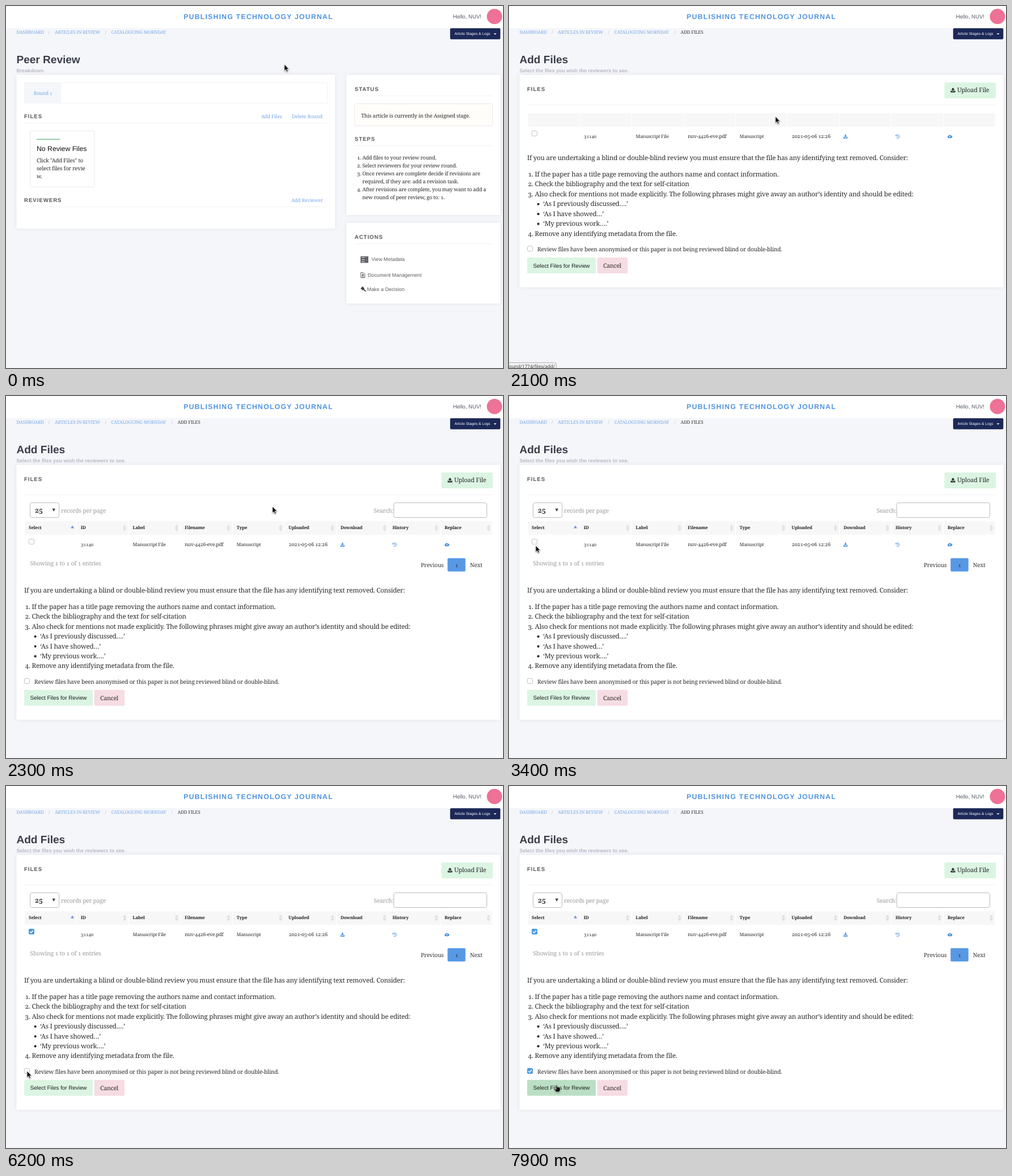
These frames come from a looping animation (876x639 px, 8 s). An HTML page:

```html
<!DOCTYPE html>
<html lang="en">
<head>
<meta charset="utf-8">
<title>Peer review</title>
<style>
html, body { margin: 0; width: 100%; height: 100%; overflow: hidden; background: #f5f6fa; }
svg { display: block; width: 876px; height: 639px; }
text { text-rendering: geometricPrecision; white-space: pre; }
.serif { font-family: "Noto Serif", serif; letter-spacing: -.021em; font-variant-numeric: oldstyle-nums; }
.sans { font-family: "Liberation Sans", Arial, sans-serif; }
.ui { font-family: "Noto Sans", sans-serif; }
.head { letter-spacing: .1em; }
.bold { font-weight: 700; }
.end { text-anchor: end; }
.mid { text-anchor: middle; }
.card { fill: #fff; filter: drop-shadow(0 0 3px rgba(60, 70, 110, .11)); }
#cursor { filter: drop-shadow(.5px 1px 1px rgba(0, 0, 0, .4)); }
</style>
</head>
<body>
<svg id="stage" viewBox="0 0 876 639"></svg>
<script>
const LOOP = 8000;
const INK = '#2b2b2b', LINK = '#77a8e6', BLUE = '#4f94e3', RULE = '#f2f2f5';

const label = (x, y, size, fill, cls, str, id = '') =>
  `<text ${id && `id="${id}"`} x="${x}" y="${y}" font-size="${size}" fill="${fill}" class="${cls}">${str}</text>`;
const serif = (x, y, size, str, fill = INK, cls = '', id) => label(x, y, size, fill, 'serif ' + cls, str, id);
const sans = (x, y, size, str, fill = INK, cls = '', id) => label(x, y, size, fill, 'sans ' + cls, str, id);
const heading = (x, y, str) => sans(x, y, 9.65, str, '#555', 'bold head');
const box = (x, y, w, h, fill, more = '') =>
  `<rect x="${x}" y="${y}" width="${w}" height="${h}" fill="${fill}" ${more}/>`;
const card = (x, y, w, h, id = '') => `<rect id="${id}" class="card" x="${x}" y="${y}" width="${w}" height="${h}" rx="1"/>`;
const rule = (x, y, w) => box(x, y, w, 1, RULE);
const path = (d, fill, more = '') => `<path d="${d}" fill="${fill}" ${more}/>`;
const line = (d, color, width = 1) => path(d, 'none', `stroke="${color}" stroke-width="${width}"`);
const at = (x, y, body, scale = 1) => `<g transform="translate(${x} ${y}) scale(${scale})">${body}</g>`;
const group = (id, ...parts) => `<g id="${id}">${parts.join('')}</g>`;

const arrowUp = 'M4 0L7 3.4H5V6.2H3V3.4H1Z';
const arrowDown = 'M4 6.2L7 2.8H5V0H3V2.8H1Z';
const tray = 'M0 5.2H2.2V6.8H5.8V5.2H8V8.2H0Z';
const cloud = 'M2 7.2A2 2 0 0 1 1.6 3.3A2.5 2.5 0 0 1 6 2.4A2.3 2.3 0 0 1 6.4 7.2Z';

const checkbox = (id, x, y) => at(x, y,
  box(.5, .5, 9, 9, '#fff', 'rx="2" stroke="#c0c0c0"') +
  group(id, box(0, 0, 10, 10, '#4b9be3', 'rx="2"'), line('M2.2 5.2L4.2 7.2L7.9 2.9', '#fff', 1.5)));

const header = [
  box(0, 0, 876, 39, '#fff'),
  sans(313, 23.2, 12.28, 'PUBLISHING TECHNOLOGY JOURNAL', BLUE, 'bold head'),
  sans(838, 22, 9.65, 'Hello, NUV!', '#555b66', 'end'),
  '<circle cx="861" cy="18.5" r="13.5" fill="#ee7196"/>',
  serif(18.5, 48.5, 8, 'DASHBOARD', LINK),
  serif(75, 48.5, 8, '/', '#b5bac5'),
  serif(86, 48.5, 8, 'ARTICLES IN REVIEW', LINK),
  serif(174.5, 48.5, 8, '/', '#b5bac5'),
  serif(185.5, 48.5, 8, 'CATALOGUING MORNDAY', LINK),
  box(782.8, 39.2, 88.5, 19.6, '#1b2858', 'rx="2"'),
  sans(790.5, 51.3, 6.6, 'Article Stages &amp; Logs', '#fff'),
  path('M859.5 48.2H864.5L862 50.8Z', '#fff'),
].join('');

const steps = ['Add files to your review round.', 'Select reviewers for your review round.',
  'Once reviews are complete decide if revisions are', 'required, if they are: add a revision task.',
  'After revisions are complete, you may want to add a', 'new round of peer review, go to: 1.'];
const stepNumbers = ['1.', '2.', '3.', '', '4.', ''];

const reviewPage = group('review',
  sans(18.5, 101, 19.05, 'Peer Review', '#3a3d4a', 'bold'),
  sans(18.5, 117.3, 8.9, 'Breakdown', '#b7bac4', 'bold'),
  card(18.5, 121.5, 561.5, 271.5),
  box(32.5, 135.5, 534, 36, '#fff', `stroke="${RULE}"`),
  box(32.5, 136, 64.5, 35.5, '#f4f6fa'),
  serif(49, 156.5, 8.5, 'Round 1', LINK),
  heading(32, 198, 'FILES'), rule(32, 206, 534),
  serif(449.5, 198, 8.75, 'Add Files', LINK, '', 'addFiles'),
  serif(504, 198, 8.75, 'Delete Round', LINK),
  box(42.5, 220.5, 113, 99, '#fff', 'rx="2" stroke="#e9e9ec"'),
  box(54, 234.7, 41, 1.3, '#62b57f'),
  sans(54, 256, 12.25, 'No Review Files', '#111'),
  ['Click "Add Files" to', 'select files for revie', 'w.'].map((s, i) => serif(54, 275.5 + i * 14.2, 9.7, s)).join(''),
  heading(32, 346, 'REVIEWERS'), rule(32, 354, 534),
  serif(503, 346, 8.7, 'Add Reviewer', LINK),
  card(600, 121.5, 271.5, 247.5),
  heading(614.5, 150, 'STATUS'), rule(614, 158, 243.5),
  box(614.5, 172.5, 243, 39, '#fffdf9', 'rx="2" stroke="#ebe9e8"'),
  serif(626, 196.5, 9.35, 'This article is currently in the Assigned stage.'),
  heading(614.5, 238, 'STEPS'), rule(614, 246, 243.5),
  steps.map((s, i) => {
    const y = 271 + i * 14;
    return serif(626, y, 9.2, stepNumbers[i], INK, 'end') + serif(628, y, 9.2, s);
  }).join(''),
  card(600, 382.5, 271.5, 142.5),
  heading(614.5, 411, 'ACTIONS'), rule(614, 419, 243.5),
  [442.5, 446.3, 450.1].map(y => box(625.5, y, 12.5, 2.8, '#777', 'stroke="#3a3a42" stroke-width=".9"') +
    box(627, y + 1, 5, .9, '#fff')).join(''),
  sans(644, 450.3, 8.92, 'View Metadata', '#5c5c5c'),
  line('M625.5 470.5H630L632.5 473V479.5H625.5Z', '#555', .9),
  at(626, 472.5, path(arrowDown, '#555'), .75),
  line('M627 478H631', '#555', .9),
  sans(637.5, 477.5, 8.92, 'Document Management', '#5c5c5c'),
  path('M628.5 495L632 498.5L628.5 502L625 498.5Z', '#444'), line('M630 500L634 503.6', '#444', 1.8),
  sans(636.5, 502.7, 8.92, 'Make a Decision', '#5c5c5c'));

const columns = ['Select', 'ID', 'Label', 'Filename', 'Type', 'Uploaded', 'Download', 'History', 'Replace'];
const columnX = i => 33.5 + i * 91.6;
const sortMark = (x, i) => i
  ? path(`M${x + 81} 11.2L${x + 84} 6.5L${x + 87} 11.2ZM${x + 81} 12.8L${x + 84} 17.5L${x + 87} 12.8Z`, '#dcdcdf')
  : path(`M${x + 80.5} 12.5L${x + 83.5} 7.5L${x + 86.5} 12.5Z`, '#6f92dd');

const table = group('table',
  columns.map((_, i) => box(columnX(i), 189, 90.3, 24, '#f7f7f8')).join(''),
  checkbox('fileTick', 40, 220),
  serif(132, 233.3, 7.9, '31140'),
  serif(223.5, 233.3, 8.1, 'Manuscript File'),
  serif(315, 233.3, 8.6, 'nuv-4426-eve.pdf'),
  serif(406.5, 233.3, 8.1, 'Manuscript'),
  serif(498.5, 233.3, 8.8, '2021-05-06 12:26'),
  at(589.5, 226.5, path(arrowDown + tray, BLUE), .9),
  at(681.3, 226.5, line('M1.2 2.4A3.3 3.3 0 1 1 1.5 6.2M4 2.2V4.4L5.4 5.2', BLUE) + path('M0 .4V3.4H3Z', BLUE), .95),
  at(772.8, 226, path(cloud, BLUE) + at(2.4, 3, path(arrowUp, '#fff'), .45)));

const tableTools = group('tools',
  box(42.5, 188.5, 51, 26, '#fff', 'rx="3" stroke="#bbb"'),
  serif(51, 206.3, 12, '25', INK, 'bold'),
  path('M81.3 198.8H87L84.15 204Z', '#444'),
  serif(97, 206, 10.3, 'records per page', '#999'),
  serif(648, 205.5, 10.3, 'Search:', '#999'),
  box(683.5, 188.5, 164, 26, '#fff', 'rx="3" stroke="#bbb"'),
  at(0, 221, columns.map((s, i) => serif(columnX(i) + 6.6, 14.3, 7.8, s, '#222', 'bold') + sortMark(columnX(i), i)).join('')),
  serif(42.5, 299, 10.4, 'Showing 1 to 1 of 1 entries', '#999'),
  serif(731, 301.5, 10.1, 'Previous', '#333'),
  box(778.3, 286.2, 31.5, 23.6, '#5798e5', 'rx="2"'),
  serif(794.2, 301.5, 9.3, '1', '#333', 'mid'),
  serif(817.8, 301.5, 10.2, 'Next', '#333'));

const advice = [
  ['1.', 'If the paper has a title page removing the authors name and contact information.'],
  ['2.', 'Check the bibliography and the text for self-citation'],
  ['3.', 'Also check for mentions not made explicitly. The following phrases might give away an author’s identity and should be edited:'],
  ['', '‘As I previously discussed….’'], ['', '‘As I have showed…’'], ['', '‘My previous work….’'],
  ['4.', 'Remove any identifying metadata from the file.']];

const guidance = group('guidance',
  serif(32, 272, 11.6, 'If you are undertaking a blind or double-blind review you must ensure that the file has any identifying text removed. Consider:'),
  advice.map(([n, s], i) => {
    const y = 301 + i * 17.45;
    return n ? serif(42.7, y, 11.65, n, INK, 'end') + serif(45.5, y, 11.65, s)
      : `<circle cx="51.6" cy="${y - 3.6}" r="2.1" fill="${INK}"/>` + serif(60, y, 11.65, s);
  }).join(''),
  checkbox('anonTick', 32, 423.3),
  serif(50, 433, 10.14, 'Review files have been anonymised or this paper is not being reviewed blind or double-blind.'),
  box(32, 444, 121, 28, '#dbf5e2', 'rx="2" id="submit"'),
  sans(42.5, 461.7, 9.83, 'Select Files for Review', '#1d1d1d'),
  box(155.5, 444, 53.5, 28, '#f6dce3', 'rx="2"'),
  serif(166, 462, 10.5, 'Cancel'));

const filesPage = group('files',
  serif(291.5, 48.5, 8, '/', '#b5bac5'),
  serif(302.5, 48.5, 8, 'ADD FILES', '#333'),
  sans(18.5, 101, 19.05, 'Add Files', '#3a3d4a', 'bold'),
  sans(18.5, 117.3, 8.88, 'Select the files you wish the reviewers to see.', '#b7bac4', 'bold'),
  card(18.5, 121.5, 853, 375, 'filesCard'),
  heading(32, 150, 'FILES'), rule(32, 174, 825.5),
  box(767.5, 135, 90.5, 28, '#dbf5e2', 'rx="2"'),
  at(778.5, 144.3, path(arrowUp + tray, '#222')),
  serif(790, 152.3, 10.9, 'Upload File'),
  table, tableTools, guidance);

const overlays = [
  group('tooltip', box(36, 518, 179, 20, '#2d2d2d', 'rx="3" fill-opacity=".96"'),
    label(40, 531.2, 8.14, '#fff', 'ui', 'Please check this box if you want to proceed.')),
  group('status',
    box(-5, 629.5, 88.5, 20, '#f1f1f2', 'id="bubble" rx="3" stroke="#b3b3b6"'),
    label(80.7, 639.2, 8.14, '#444', 'ui end', 'round/1774/files/add/', 'address')),
  group('cursor',
    path('M0 0V11.6L2.7 9.2L4.5 13.2L6.6 12.3L4.8 8.4H8.4Z', '#111', 'id="arrow" stroke="#fff" stroke-width=".8"'),
    path('M-1 .8Q0-.6 1 .8V4Q2 3.2 2.8 4.2Q3.8 3.6 4.6 4.6Q6 4.2 6.3 5.8V9L5 12.8H-1.2L-4.2 8.2Q-4.4 6.6-2.8 7L-1 8.4Z', '#111',
      'id="hand" stroke="#fff" stroke-width=".7"')),
].join('');

document.getElementById('stage').innerHTML =
  box(0, 0, 876, 639, '#f5f6fa') + header + reviewPage + filesPage + overlays;

// time, tip x, tip y
const pointer = [
  [0, 490.5, 103], [200, 490, 107], [300, 488, 118], [400, 484, 136], [500, 480, 156],
  [600, 476, 174], [700, 473, 189], [800, 472, 200], [1200, 471, 197], [1300, 470.5, 194.3],
  [2100, 469.5, 195], [3000, 420, 222], [3100, 290, 276], [3200, 130, 315], [3300, 37, 296],
  [3400, 47, 264], [3600, 46, 260], [3700, 45, 256.5], [5300, 38, 301], [5700, 132.5, 521],
  [6000, 98, 517], [6100, 56, 509], [6200, 37, 503], [6400, 36.5, 503], [6500, 36, 503],
  [7700, 46, 514], [7800, 70, 527], [7900, 84, 527.3]];

const el = id => document.getElementById(id);
const show = (id, on) => el(id).setAttribute('visibility', on ? 'inherit' : 'hidden');
const start = performance.now();

function draw() {
  const t = (performance.now() - start) % LOOP;
  const within = (a, b = LOOP) => t >= a && t < b;
  const onFiles = within(2100), ready = within(2300), onLink = within(700, 2100), onSubmit = within(7800);

  el('review').style.display = onFiles ? 'none' : '';
  el('files').style.display = onFiles ? '' : 'none';
  el('addFiles').setAttribute('fill', onLink ? '#3c78c2' : LINK);
  show('tools', ready);
  el('table').setAttribute('transform', `translate(0 ${ready ? 32 : 0})`);
  el('guidance').setAttribute('transform', `translate(0 ${ready ? 74.8 : 0})`);
  el('filesCard').setAttribute('height', ready ? 450 : 375);

  show('status', within(700, 2300));
  show('address', within(700, 2200));
  el('bubble').setAttribute('width', within(2200) ? 29.5 : 88.5);

  show('fileTick', within(4100));
  show('anonTick', within(7600));
  show('tooltip', within(7200, 7600));
  el('submit').setAttribute('fill', within(7900) ? '#badfc4' : onSubmit ? '#cbead3' : '#dbf5e2');

  const [, x, y] = pointer.findLast(step => step[0] <= t);
  el('cursor').setAttribute('transform', `translate(${x} ${y})`);
  show('hand', onLink || onSubmit);
  show('arrow', !onLink && !onSubmit);
  requestAnimationFrame(draw);
}
draw();
</script>
</body>
</html>
```
